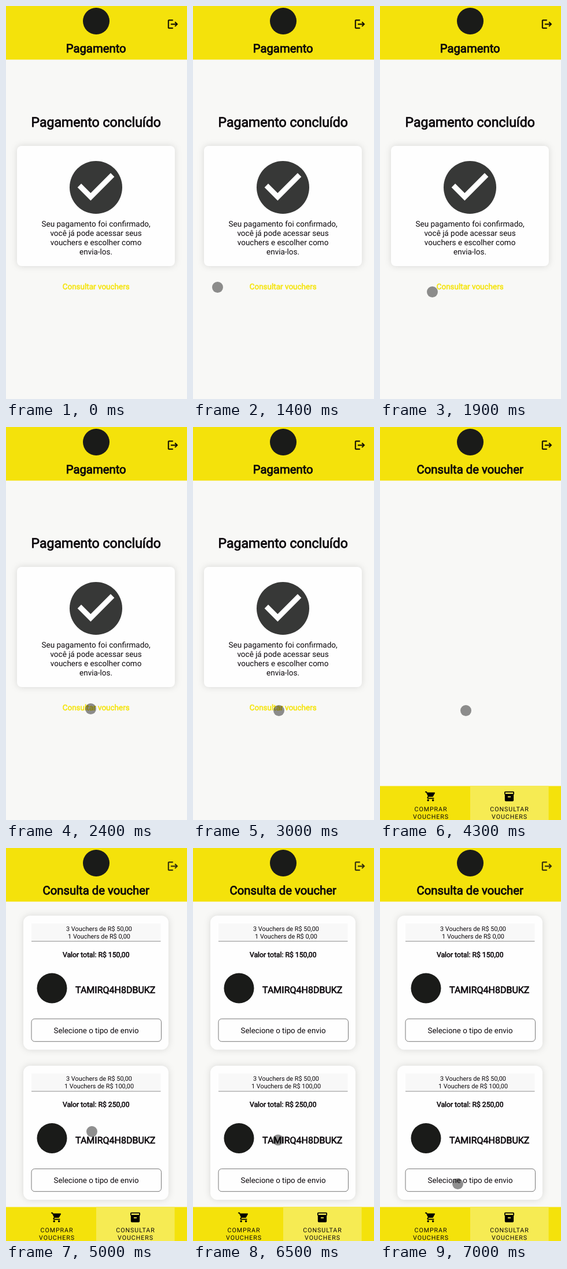
An HTML page for the animation above (8000 ms loop, 313 by 677 pixels).

```html
<!DOCTYPE html>
<html lang="pt">
<head>
<meta charset="utf-8">
<title>Vouchers</title>
<style>
html, body { margin: 0; width: 100%; height: 100%; overflow: hidden; background: #f8f8f6; }
svg { display: block; width: 313px; height: 677px; font-family: Roboto, sans-serif; text-rendering: geometricPrecision; }
text { fill: #0c080c; text-anchor: middle; }
.bold { stroke: #0c080c; stroke-width: .85px; }
.link { fill: var(--c); stroke: var(--c); stroke-width: .55px; }
.card { fill: #fefefe; filter: drop-shadow(0 0 6px rgba(0,0,0,.13)); }
.nav { font-size: 10.7px; letter-spacing: .92px; }
</style>
</head>
<body>
<svg viewBox="0 0 313 677">
  <rect width="313" height="677" fill="#f8f8f6"/>
  <rect width="313" height="92.4" fill="#f4e20b"/>
  <circle cx="156" cy="26" r="23" fill="#1a1b19"/>
  <path id="exit" transform="translate(278.3 21) scale(.86)" stroke-width=".4" d="M17 7l-1.41 1.41L18.17 11H8v2h10.17l-2.58 2.58L17 17l5-5zM4 5h8V3H4c-1.1 0-2 .9-2 2v14c0 1.1.9 2 2 2h8v-2H4V5z"/>
  <text id="title" class="bold" x="155.7" y="79.5" font-size="20.3"></text>

  <g id="paid">
    <text class="bold" x="155.7" y="207.6" font-size="23.1">Pagamento concluído</text>
    <rect class="card" x="19" y="241" width="273" height="207" rx="8"/>
    <circle cx="155.5" cy="312.5" r="45.5" fill="#373837"/>
    <path transform="translate(100.9 257.9) scale(4.55)" fill="#fefefe" d="M10 17l-5-5 1.41-1.41L10 14.17l7.59-7.59L19 8z"/>
    <g id="note" font-size="13.5"></g>
    <text id="link" class="link" x="155.7" y="487.5" font-size="13.5">Consultar vouchers</text>
  </g>

  <g id="list"></g>

  <g id="nav">
    <rect y="618" width="313" height="59" fill="#f4e20b"/>
    <rect y="618" width="313" height="1" fill="#f8f8f6" opacity=".45"/>
    <rect x="156" y="618" width="135.6" height="59" fill="#f6eb53"/>
    <path transform="translate(77.2 626) scale(.85)" d="M7 18c-1.1 0-1.99.9-1.99 2S5.9 22 7 22s2-.9 2-2-.9-2-2-2zM1 2v2h2l3.6 7.59-1.35 2.45c-.16.28-.25.61-.25.96 0 1.1.9 2 2 2h12v-2H7.42c-.14 0-.25-.11-.25-.25l.03-.12.9-1.63h7.45c.75 0 1.41-.41 1.75-1.03l3.58-6.49c.08-.14.12-.31.12-.48 0-.55-.45-1-1-1H5.21l-.94-2H1zm16 16c-1.1 0-1.99.9-1.99 2s.89 2 1.99 2 2-.9 2-2-.9-2-2-2z"/>
    <path transform="translate(213.3 626) scale(.85)" d="M20 2H4c-1 0-2 .9-2 2v3.01c0 .72.43 1.34 1 1.69V20c0 1.1 1.1 2 2 2h14c.9 0 2-.9 2-2V8.7c.57-.35 1-.97 1-1.69V4c0-1.1-1-2-2-2zm-5 12H9v-2h6v2zm5-7H4V4h16v3z"/>
    <text class="nav" x="88" y="662">COMPRAR</text>
    <text class="nav" x="88" y="675">VOUCHERS</text>
    <text class="nav" x="224" y="662">CONSULTAR</text>
    <text class="nav" x="224" y="675">VOUCHERS</text>
  </g>

  <circle id="cursor" r="9.5" fill="#000" fill-opacity=".435"/>
</svg>
<script>
const LOOP = 8000, OPEN = 4300, LOADED = 5000;
const $ = id => document.getElementById(id);

$('note').innerHTML = [
  'Seu pagamento foi confirmado,',
  'você já pode acessar seus',
  'vouchers e escolher como',
  'envia-los.'
].map((s, i) => `<text x="155.6" y="${380 + 16 * i}">${s}</text>`).join('');

const card = (y, extra, total) => `<g transform="translate(0 ${y})">
  <rect class="card" x="30" y="116.5" width="251" height="231" rx="12"/>
  <rect x="44" y="130" width="223.5" height="30" fill="#f8f8f8"/>
  <rect x="44" y="160.2" width="223.5" height="1" fill="#8c8c8c"/>
  <g font-size="10.9">
    <text x="161" y="143">3 Vouchers de R$ 50,00</text>
    <text x="161" y="156">1 Vouchers de R$ ${extra},00</text>
  </g>
  <text class="bold" style="stroke-width:.55px" x="155.7" y="187.5" font-size="12.2">Valor total: R$ ${total},00</text>
  <circle cx="79.5" cy="241.5" r="26" fill="#1a1b19"/>
  <text class="bold" style="stroke-width:.65px;text-anchor:start" x="120" y="250.2" font-size="16">TAMIRQ4H8DBUKZ</text>
  <rect x="44" y="294.3" width="224.5" height="39" rx="5.5" fill="#fefefe" stroke="#777"/>
  <text x="156" y="319" font-size="13.3">Selecione o tipo de envio</text>
</g>`;
$('list').innerHTML = card(0, 0, 150) + card(258.4, 100, 250);

// time, x, y: the pointer holds each place until the next
const path = [
  [1400, 42.5, 484.5], [1700, 57, 494], [1800, 72, 497.5], [1900, 90.5, 492.5],
  [2000, 128.5, 487.5], [2200, 105.5, 487], [2300, 126, 486], [2400, 146.5, 485.5],
  [2600, 126.5, 488.5], [2700, 140.5, 486.5], [3000, 148.5, 488.5],
  [6500, 147, 503], [6600, 139, 528], [6700, 135.5, 552], [6800, 140.5, 568.5],
  [7000, 134.5, 578.5]
];

const show = (id, on) => $(id).setAttribute('display', on ? 'inline' : 'none');

function draw(t) {
  const opened = t >= OPEN, ink = t >= LOADED ? '#2b2810' : '#0c0a04';
  show('paid', !opened);
  show('nav', opened);
  show('list', t >= LOADED);
  $('title').textContent = opened ? 'Consulta de voucher' : 'Pagamento';
  $('exit').setAttribute('fill', ink);
  $('exit').setAttribute('stroke', ink);
  $('link').style.setProperty('--c', t >= 4200 ? '#f0de16' : '#f5e40c');
  const at = path.filter(p => p[0] <= t).pop();
  show('cursor', at);
  if (at) $('cursor').setAttribute('transform', `translate(${at[1]} ${at[2]})`);
}

function tick() {
  draw(performance.now() % LOOP);
  requestAnimationFrame(tick);
}
tick();
</script>
</body>
</html>
```
